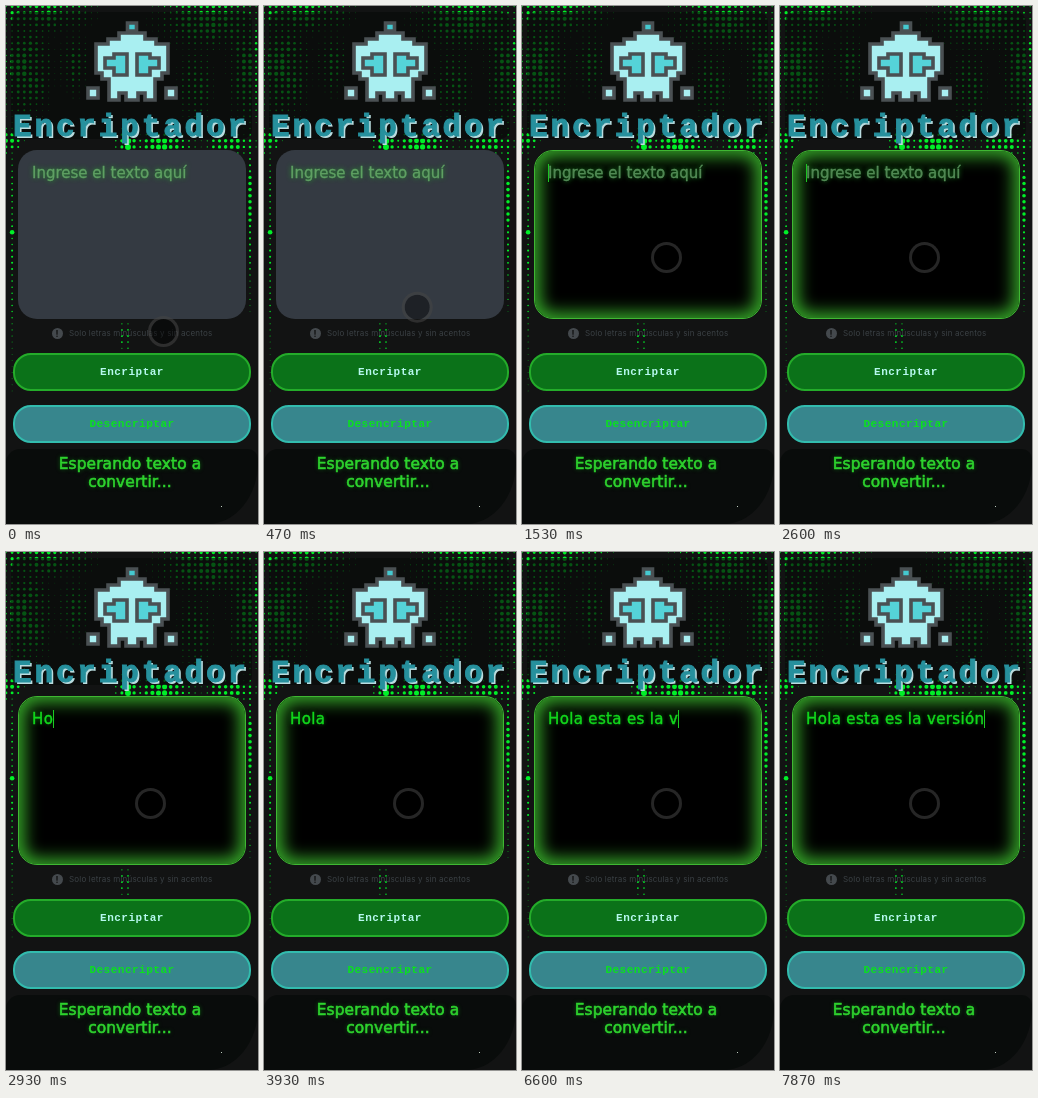
These frames come from a looping animation (252x518 px, 8000 ms). An HTML page with a canvas:

```html
<!DOCTYPE html>
<html lang="es">
<head>
<meta charset="utf-8">
<title>Encriptador</title>
<style>
  html, body { margin: 0; width: 100%; height: 100%; overflow: hidden; background: #121313; }
  #stage { position: relative; width: 252px; height: 518px; overflow: hidden; }
  #stage > * { position: absolute; box-sizing: border-box; white-space: pre; }
  #dots, #robot { left: 0; top: 0; }
  #shade { left: 5px; top: 6px; width: 241px; height: 127px; border-radius: 10px; background: rgba(8, 11, 10, .68); }
  #title {
    left: 7px; top: 107.6px; margin: 0; color: #26909d;
    font: bold 31px/28px "Liberation Mono", monospace; letter-spacing: 2.85px;
    -webkit-text-stroke: .9px #26909d; text-shadow: 2px 2px 0 #b9dcdf;
  }
  #box {
    left: 12px; top: 144px; width: 228px; height: 168.5px; padding: 14px;
    border-radius: 19px; background: #343a42;
    font: 15px/18px "DejaVu Sans", sans-serif;
  }
  #box.focus { background: #000; border: 1px solid #3fb733; padding: 13px; box-shadow: inset 0 0 16px 6px #339f27; }
  #typed { color: #12d81c; letter-spacing: .35px; -webkit-text-stroke: .4px #12d81c; text-shadow: 0 0 4px #0a7c10; }
  #hint { color: #5fa063; -webkit-text-stroke: .3px #5fa063; text-shadow: 0 0 5px #23a02a; }
  .focus #hint { color: #4f8552; }
  #caret { display: inline-block; vertical-align: top; width: 1px; height: 18px; margin-right: -1px; background: #1ccb22; }
  #note { left: 63px; top: 321px; color: #3b4145; font: 8px/12px Inter, sans-serif; letter-spacing: .18px; }
  #mark {
    left: 45.5px; top: 321.5px; width: 11px; height: 11px; border-radius: 50%; background: #44494d;
    color: #121313; font: bold 9px/11px Inter, sans-serif; text-align: center;
  }
  .button {
    left: 7px; width: 238px; height: 38px; border-radius: 18px; border: 2px solid;
    text-align: center; font: bold 11px/34px "Liberation Mono", monospace; letter-spacing: .5px;
  }
  #encode { top: 347px; background: #0b7219; border-color: #24ac2a; color: #b6f8ee; }
  #decode { top: 399px; background: #37868d; border-color: #32bcae; color: #0be01f; }
  #panel { left: 0; top: 443px; width: 252px; height: 75px; border-radius: 14px 10px 50px 0 / 14px 10px 62px 0; background: #090c0b; }
  #result {
    left: 0; top: 449px; width: 248px; text-align: center; color: #2ed32e;
    font: 15.4px/18px "DejaVu Sans", sans-serif; letter-spacing: .1px;
    -webkit-text-stroke: .6px #2ed32e; text-shadow: 0 0 4px #0d6d12;
  }
  #speck { left: 215px; top: 500px; width: 1px; height: 1px; background: #bccbbd; }
  #ring {
    left: -15.5px; top: -15.5px; width: 31px; height: 31px; border-radius: 50%;
    border: 3px solid rgba(70, 70, 70, .55);
    background: rgba(0, 0, 0, .42) padding-box;
  }
</style>
</head>
<body>
<div id="stage">
  <canvas id="dots" width="252" height="518"></canvas>
  <div id="shade"></div>
  <svg id="robot" width="252" height="110" stroke="#4a5053" stroke-width="3.6" fill="#a9eff1">
    <path d="M122.500 24h7v6h-7z"/>
    <path fill="#45c9d0" d="M121.500 17h9v8h-9z"/>
    <path d="M113 27h26v6h11v5h12v29h-6v6h-7v21h-10v-7h-7v7h-12v-7h-7v7h-10v-21h-7v-6h-6v-29h12v-5h11z"/>
    <g id="half">
      <path d="M82 82h10v10h-10z"/>
      <path fill="#55d3d8" d="M99 52h9v-4h13v21h-13v-7h-9z"/>
    </g>
    <use href="#half" transform="matrix(-1 0 0 1 252 0)"/>
  </svg>
  <h1 id="title">Encriptador</h1>
  <div id="box"><span id="typed"></span><i id="caret"></i><span id="hint">Ingrese el texto aquí</span></div>
  <div id="mark">!</div>
  <div id="note">Solo letras minúsculas y sin acentos</div>
  <div id="encode" class="button">Encriptar</div>
  <div id="decode" class="button">Desencriptar</div>
  <div id="panel"></div>
  <div id="result">Esperando texto a
convertir...</div>
  <div id="speck"></div>
  <div id="ring"></div>
</div>
<script>
const LOOP = 8000;
const TEXT = "Hola esta es la versión";
const KEYS = [2800, 2930, 3130, 3270, 3400, 5070, 5270, 5470, 5600, 5670, 5800, 6000,
  6070, 6270, 6330, 6400, 6600, 6800, 6930, 7130, 7200, 7670, 7870];
const CARET_OFF = [[2000, 2530], [3930, 4400], [4930, 5070]];
const FOCUS = 1530;
const [typed, caret, hint, box, ring] =
  ["typed", "caret", "hint", "box", "ring"].map(id => document.getElementById(id));

// Halftone backdrop: dot radius follows soft patches [x, y, rx, ry, radius].
function drawDots() {
  const g = document.getElementById("dots").getContext("2d");
  const patches = [
    [35, 8, 48, 18, 2.3], [20, 65, 24, 45, 2.4], [68, 55, 14, 35, 1.6],
    [205, 14, 48, 26, 2.3], [190, 80, 18, 36, 1.6], [240, 60, 16, 55, 2],
    [2, 134, 12, 12, 2.8], [122, 137, 10, 14, 3.6], [155, 138, 28, 10, 2.8],
    [225, 138, 25, 9, 2.6], [6, 226, 3, 6, 3.4], [6, 230, 4, 150, 1.1],
    [244, 200, 4, 85, 1.8], [119, 330, 5, 18, 1.8]
  ];
  const step = 6.1;
  g.fillStyle = "#00f028";
  for (let row = 0; row < 73; row++) {
    for (let col = 0; col < 42; col++) {
      const x = col * step, y = .6 + row * step;
      const noise = Math.abs(Math.sin(col * 12.99 + (row >> 2) * 78.23) * 43758.5) % 1;
      let r = 0;
      for (const [cx, cy, rx, ry, size] of patches)
        r = Math.max(r, size * Math.exp(-(((x - cx) / rx) ** 2) - ((y - cy) / ry) ** 2));
      r *= .65 + .4 * noise;
      if (r < .35) continue;
      g.beginPath();
      g.arc(x, y, r, 0, 2 * Math.PI);
      g.fill();
    }
  }
}

const ease = p => p * p * (3 - 2 * p);

function render(t) {
  const count = KEYS.filter(k => t >= k).length;
  const focused = t >= FOCUS;
  const blink = CARET_OFF.some(([a, b]) => t >= a && t < b);
  typed.textContent = TEXT.slice(0, count);
  hint.style.display = count ? "none" : "";
  caret.style.visibility = focused && !blink ? "visible" : "hidden";
  box.className = focused ? "focus" : "";

  // The pointer moves in steps of 1/15 s.
  const tick = Math.floor(t * .015 + .01) / .015;
  const p = ease(Math.min(1, Math.max(0, (tick - 134) / 866)));
  ring.style.transform = `translate(${157 - 13 * p}px, ${325 - 74 * p}px)`;
}

function loop() {
  render(performance.now() % LOOP);
  requestAnimationFrame(loop);
}

drawDots();
loop();
</script>
</body>
</html>
```
